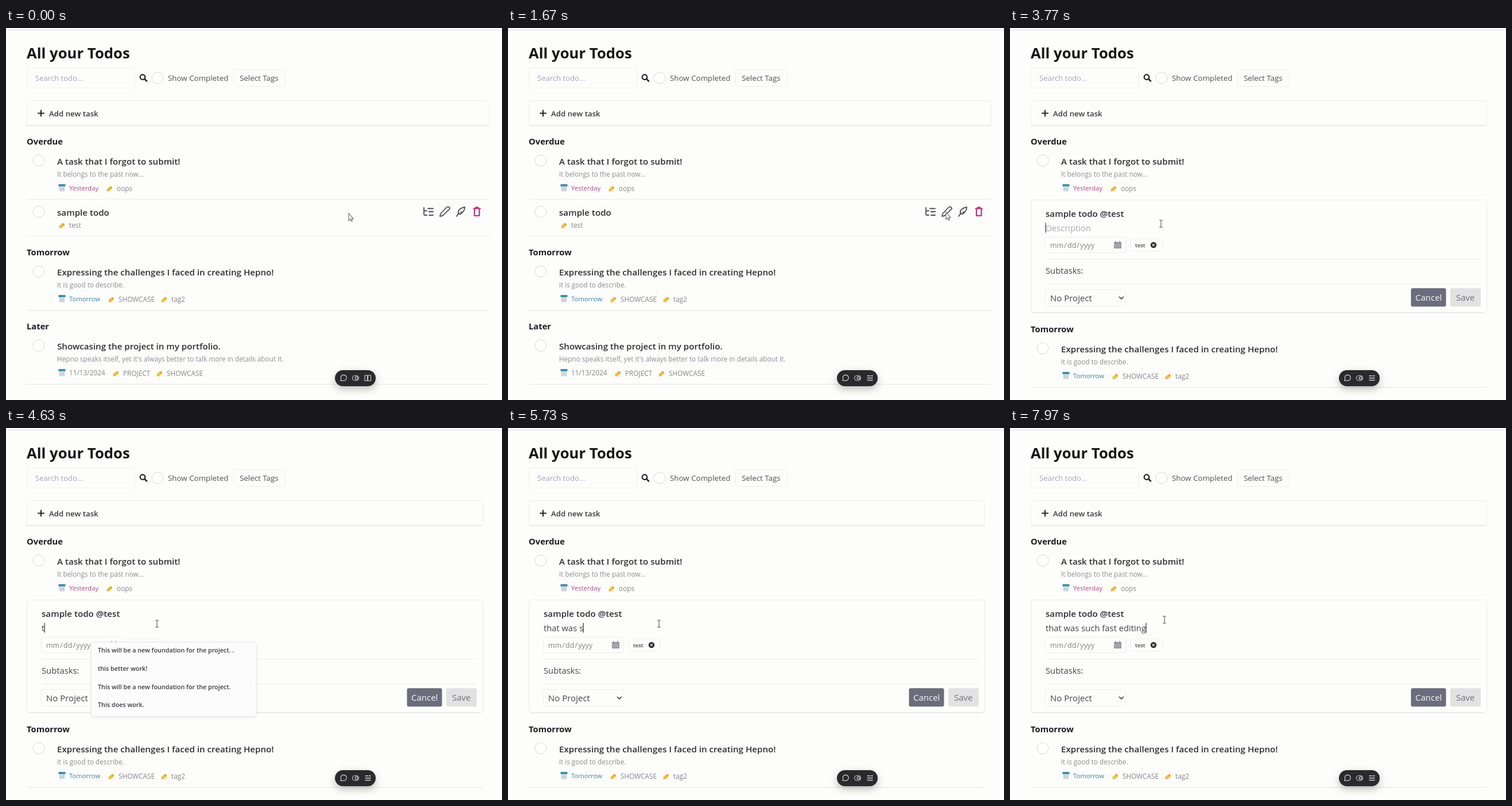
An HTML page that plays this animation: 864x648 px, repeating every 8000 ms.

```html
<!DOCTYPE html>
<html lang="en">
<head>
<meta charset="utf-8">
<title>Todo list</title>
<style>
html, body { margin: 0; width: 100%; height: 100%; overflow: hidden; background: #fdfdfb; }
svg { display: block; width: 100%; height: 100%; }
text { font-family: "Open Sans", "Noto Sans", sans-serif; font-size: 15px; fill: #44444c; white-space: pre; }
.h1 { font-size: 25.7px; font-weight: 700; fill: #17171a; }
.h2 { font-size: 14.75px; font-weight: 700; fill: #1c1c20; }
.title { font-size: 15.15px; font-weight: 600; fill: #2e2e33; }
.note { font-size: 11.75px; fill: #8e8e94; }
.tag { font-size: 11.8px; fill: #86868d; }
.date { font-size: 11.3px; }
.ui { font-size: 13.35px; fill: #505058; }
.hint { font-size: 13.1px; fill: #a3a5b6; }
.add { font-size: 13.25px; font-weight: 600; fill: #38383d; }
.mid { font-size: 14.8px; }
.faint { fill: #a9abba; }
.mask { font-size: 12.4px; fill: #808086; }
.chip { font-size: 9.5px; font-weight: 600; }
.option { font-size: 10.75px; font-weight: 600; fill: #3a3a40; }
.box { fill: none; stroke: #eeeee8; }
.rule { stroke: #ebebeb; }
.wide.line { fill: #e4e4e2; }
.icon { fill: none; stroke-linecap: round; stroke-linejoin: round; }
</style>
</head>
<body>
<svg id="stage" viewBox="0 0 864 648"></svg>
<script>
const LOOP = 8000, OPEN_AT = 1750, FOCUS_AT = 3350, SHIFT = 134;
const MESSAGE = "that was such fast editing";

const text = (x, y, cls, s, extra = "") => `<text x="${x}" y="${y}" class="${cls}" ${extra}>${s}</text>`;
const box = (x, y, w, h, r = 3, extra = "") =>
  `<rect class="box" x="${x + .5}" y="${y + .5}" width="${w}" height="${h}" rx="${r}" ${extra}/>`;
const rule = (x1, x2, y, extra = "") => `<path class="rule" d="M${x1} ${y + .5}H${x2}" ${extra}/>`;
const wideLine = (y, h = 1) => `<rect class="wide line" x="36" y="${y}" height="${h}"/>`;
const stroke = (d, color, width = 1.5) => `<path class="icon" d="${d}" stroke="${color}" stroke-width="${width}"/>`;
const ring = (x, y) => `<circle cx="${x}" cy="${y}" r="10" fill="#fefefd" stroke="#d9d9dc"/>`;

const calendar = (x, y) => `<g transform="translate(${x} ${y})">
  <path d="M-5 -4H5V5.500H-5Z" fill="#dce3e7"/><path d="M-6 -7H6V-3H-6Z" fill="#3f91b5"/>
  <path d="M-3 -1V5M0 -1V5M3 -1V5" stroke="#8c9da6" stroke-dasharray="1.500 1"/></g>`;
const label = (x, y) => `<g transform="translate(${x} ${y}) rotate(-40)">
  <path d="M-4 -2.700H4.500L6.200 0 4.500 2.700H-4Z" fill="#f2bf3d"/>
  <path d="M-6 0H-3" stroke="#b78d42"/><circle cx="3.800" r=".8" fill="#a6742c"/></g>`;
const tag = (x, y, s) => label(x, y - 3.5) + text(x + 13, y, "tag", s);
const date = (y, s, color, cls = "date") => calendar(97.5, y - 4) + text(110, y, "tag " + cls, s, `style="fill:${color}"`);
const task = (y, title, note) => ring(57, y - 7) + text(89, y, "title", title) + (note ? text(89, y + 21, "note", note) : "");

const header = rule(0, 864, 3.5, 'style="stroke:#dfdfea"') +
  text(36, 52.5, "h1", "All your Todos") +
  box(36, 69, 188, 35) + text(51, 92, "hint", "Search todo...") +
  `<circle cx="238" cy="85.500" r="4.300" fill="none" stroke="#222226" stroke-width="2.200"/>` + stroke("M241.500 89L245 92.500", "#222226", 2.5) +
  ring(264, 87) + text(282, 92, "ui", "Show Completed") +
  box(396, 72, 90, 29) + text(407, 92, "ui", "Select Tags") +
  `<rect class="box wide" x="36.500" y="126.500" height="43" rx="3"/>` + wideLine(169, 1.5) +
  stroke("M56 148.500H66M61 143.500V153.500", "#26262a", 2.1) + text(75, 153.5, "add", "Add new task");

const overdue = text(36, 203, "h2", "Overdue") +
  task(238, "A task that I forgot to submit!", "It belongs to the past now...") +
  date(283, "Yesterday", "#b5438b") + tag(180, 284, "oops");

const actions =
  stroke("M728 313V324Q728 326 730 326H733M728 318.500H733M735 314.500H744M737 320H744M737 326H744", "#4d4d58", 1.8) +
  stroke("M756 328L757 323.500 768 312Q770 310.500 772 312.500T772 316L760.500 327Z", "#55555f", 1.8) +
  stroke("M785 328L789 322M788 324V319Q790 314 799 312Q799 318 795 321H792M795 321Q793 325 788 324", "#4d4d58", 1.8) +
  stroke("M814.500 314.500H826M818 313.500V312.500H822.500V313.500M816 315V327H824.500V315", "#c12d80", 2.2);

const row = rule(36, 842, 298) + ring(57, 320) + text(89, 327, "title", "sample todo") + tag(97, 348, "test") + actions + rule(36, 842, 362.5);

const form = `<rect class="box" x="36.500" y="299.500" width="794" height="196" rx="5" style="stroke:#e8e8e4"/>` +
  rule(39, 828, 496) +
  text(62, 328.5, "title", "sample todo @test") + text(62, 353.5, "mid", "", 'id="typed"') +
  `<path id="caret" d="M0 339.500V356.500" stroke="#333338" stroke-width="1.200"/>` +
  box(61, 364, 140, 27) + text(70, 383, "mask", "mm&#8202;/&#8202;dd&#8202;/&#8202;yyyy") +
  `<path d="M181 373H194V384H181Z" fill="#93939b"/><path d="M182 376.500H193M182 379H193M182 381.500H193" stroke="#e8e8ea" stroke-width=".8" stroke-dasharray="1.600 1"/>` +
  stroke("M184 371.500V374M191 371.500V374", "#808088", 1.4) +
  box(210, 367, 55, 21) + text(218, 381.5, "chip", "test") +
  `<circle cx="250" cy="378" r="5.200" fill="#2f2f34"/>` + stroke("M248.300 376.300L251.700 379.700M251.700 376.300L248.300 379.700", "#fff", 1.2) +
  rule(62, 819, 402) + text(62, 428, "mid", "Subtasks:") + rule(62, 819, 445) +
  box(61, 455, 140, 29) + text(70, 475.5, "", "No Project") + stroke("M190.500 468.500L194 472 197.500 468.500", "#38383e", 1.7) +
  `<rect x="698.500" y="453.300" width="61" height="32" rx="3" fill="#6b6c7c"/>` + text(706, 475, "", "Cancel", 'style="fill:#fafafa"') +
  `<rect x="767" y="453.300" width="53" height="32" rx="3" fill="#e2e2e3"/>` + text(777, 475, "", "Save", 'style="fill:#717178"');

const options = ["This will be a new foundation for the project. .", "this better work!",
  "This will be a new foundation for the project.", "This does work."];
const popup = `<rect x="148.500" y="373" width="287.500" height="129.500" rx="5" fill="#fcfcfc" stroke="#e8e8ec" filter="url(#soft)"/>` +
  options.map((s, i) => text(160, 390.7 + i * 31.9, "option", s)).join("");

const upcoming = text(36, 396, "h2", "Tomorrow") +
  task(431, "Expressing the challenges I faced in creating Hepno!", "it is good to describe.") +
  date(476, "Tomorrow", "#3585ad") + tag(183, 477, "SHOWCASE") + tag(275, 477, "tag2") +
  wideLine(491.5) +
  text(36, 525, "h2", "Later") +
  task(560, "Showcasing the project in my portfolio.", "Hepno speaks itself, yet it's always better to talk more in details about it.") +
  date(605, "11/13/2024", "#86868d", "") + tag(191, 606, "PROJECT") + tag(267, 606, "SHOWCASE") +
  wideLine(620);

const toolbar = `<rect x="573" y="596" width="71" height="28" rx="14" fill="#2c2c2d" filter="url(#deep)"/>` +
  stroke("M583 614.500L583.700 611.500A5 5 0 1 1 586.500 614Z", "#d5d5d7", 1.2) +
  `<rect x="603.500" y="605.500" width="11" height="8.500" rx="4.200" fill="none" stroke="#c4c4c7" stroke-width="1.200"/>
   <circle cx="610.500" cy="609.700" r="2.300" fill="none" stroke="#d5d5d7" stroke-width="1.200"/>` +
  `<g id="panels">${stroke("M625 605H629.500V614.500H625ZM630.500 605H635.500V614.500H630.500Z", "#c8c8cb", 1.2)}</g>` +
  `<g id="lines">${stroke("M626 606H631M626 609.700H635M626 613.500H635", "#d5d5d7", 1.4)}<circle cx="634" cy="606" r="1.400" fill="#a9c4de"/></g>`;

const pointer = `<path id="arrow" d="M0 0V12.500L2.800 10 4.700 14 6.500 13 4.800 9.300H8Z" fill="#fff" stroke="#6c6c72" stroke-width="1.100"/>` +
  `<g id="beam">${stroke("M-2.500 -6H2.500M0 -6V6M-2.500 6H2.500", "#55555b", 1.1)}</g>`;

const stage = document.getElementById("stage");
stage.innerHTML = `<defs>
  <filter id="soft" x="-10%" y="-15%" width="120%" height="135%"><feDropShadow dx="0" dy="1.500" stdDeviation="2" flood-opacity=".08"/></filter>
  <filter id="deep" x="-40%" y="-70%" width="180%" height="280%"><feDropShadow dx="0" dy="5" stdDeviation="7" flood-opacity=".25"/></filter>
  </defs><rect width="864" height="648" fill="#fdfdfb"/>` + header + overdue +
  `<g id="row">${row}</g><g id="form">${form}</g><g id="upcoming">${upcoming}</g><g id="popup">${popup}</g>` + toolbar + pointer;

const $ = id => document.getElementById(id);
const show = (id, on) => $(id).setAttribute("visibility", on ? "visible" : "hidden");
const wide = stage.querySelectorAll(".wide");

// time, x, y
const path = [[0, 597, 323], [200, 597, 323], [930, 698, 333], [1450, 763, 321], [1800, 763, 321],
  [2450, 292, 357], [2800, 292, 357], [3250, 263, 341], [5950, 263, 341], [6350, 269, 334], [LOOP, 269, 334]];

// first key time, interval, number of keys
const bursts = [[4560, 128, 10], [5900, 190, 7], [7130, 100, 9]];
const keys = bursts.flatMap(([start, gap, count]) => Array.from({ length: count }, (_, i) => start + i * gap));

function pointerAt(t) {
  const i = path.findIndex(p => p[0] > t);
  const [t0, x0, y0] = path[i - 1], [t1, x1, y1] = path[i];
  const u = (t - t0) / (t1 - t0), e = u * u * (3 - 2 * u);
  return [x0 + (x1 - x0) * e, y0 + (y1 - y0) * e];
}

function draw(t) {
  const open = t >= OPEN_AT, beam = t >= 2250;
  show("row", !open);
  show("form", open);
  $("upcoming").setAttribute("transform", `translate(0 ${open ? SHIFT : 0})`);
  wide.forEach(r => r.setAttribute("width", open ? 794 : 805));

  const count = keys.filter(k => k <= t).length;
  const typed = $("typed");
  typed.textContent = count ? MESSAGE.slice(0, count) : "Description";
  typed.classList.toggle("faint", !count);
  const last = count ? keys[count - 1] : FOCUS_AT;
  show("caret", t >= FOCUS_AT && (t - last) % 1000 < 500);
  const caretX = 62 + (count ? typed.getComputedTextLength() : 0);
  $("caret").setAttribute("transform", `translate(${caretX} 0)`);
  show("popup", count === 1 || count === 2);

  show("panels", t < 400);
  show("lines", t >= 400);
  const place = `translate(${pointerAt(t).join(" ")})`;
  for (const id of ["arrow", "beam"]) $(id).setAttribute("transform", place);
  show("arrow", !beam);
  show("beam", beam);
}

const begin = performance.now();
function tick() {
  draw((performance.now() - begin) % LOOP);
  requestAnimationFrame(tick);
}
tick();
</script>
</body>
</html>
```
